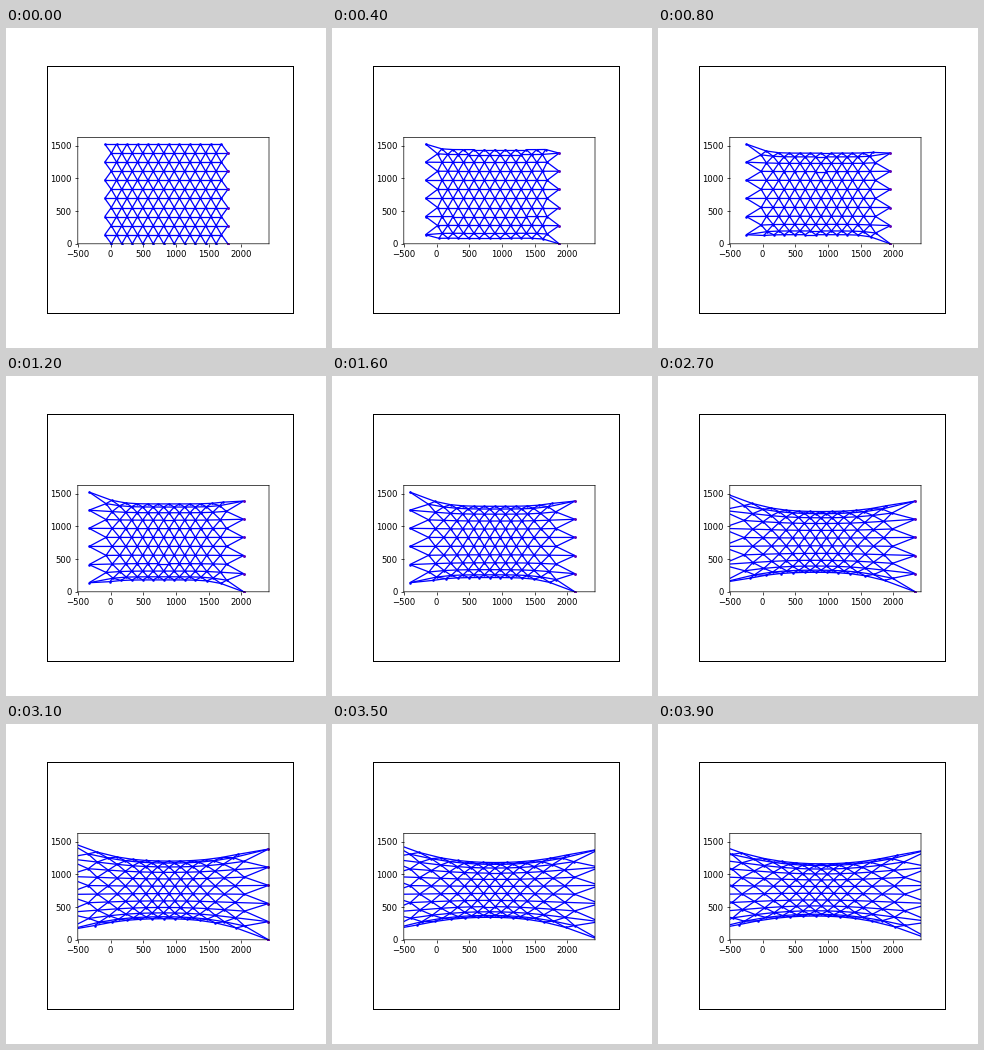
Write a matplotlib script that moves like this. It is 320 by 320 pixels and loops after 4000 ms.

```python
import numpy as np
import matplotlib.pyplot as plt
from matplotlib.animation import FuncAnimation
from matplotlib.collections import LineCollection

STAGE = 320
FRAMES = 40
N = 12                # nodes per row and number of rows
SPACING = 160
ROW = SPACING * np.sqrt(3) / 2
LEFT = 12             # x of the first node in even rows
PULL = 20             # outward shift of the clamped ends per frame
RATE = 0.1            # relaxation rate
ZOOM = 0.616          # the chart is a scaled-down figure


def px_axes(fig, left, top, right, bottom):
    return fig.add_axes([left / STAGE, 1 - bottom / STAGE,
                         (right - left) / STAGE, (bottom - top) / STAGE])


def lattice():
    """Node positions and the index pairs joined by springs."""
    row, col = np.divmod(np.arange(N * N), N)
    x = LEFT + col * SPACING - (row % 2) * SPACING / 2
    nodes = np.column_stack([x, row * ROW]).astype(float)
    edges = []
    for r in range(N):
        for c in range(N):
            i = r * N + c
            if c < N - 1:
                edges.append((i, i + 1))
            if r < N - 1:
                side = c + 1 if r % 2 == 0 else c - 1
                edges.append((i, i + N))
                if 0 <= side < N:
                    edges.append((i, (r + 1) * N + side))
    return nodes, np.array(edges)


def simulate(nodes, edges):
    """Zero-length springs relax while the clamped ends move outward."""
    a, b = edges.T
    left = np.arange(1, N, 2) * N
    right = np.arange(0, N, 2) * N + N - 1
    free = np.ones(len(nodes), bool)
    free[left] = free[right] = False
    pos = nodes.copy()
    states = []
    for _ in range(FRAMES):
        pos[left, 0] -= PULL
        pos[right, 0] += PULL
        states.append(pos.copy())
        force = np.zeros_like(pos)
        stretch = pos[b] - pos[a]
        np.add.at(force, a, stretch)
        np.add.at(force, b, -stretch)
        pos[free] += RATE * force[free]
    return states, right


nodes, edges = lattice()
states, right_ends = simulate(nodes, edges)

fig = plt.figure(figsize=(3.2, 3.2), dpi=100, facecolor="white")

frame_ax = px_axes(fig, 40.8, 38.4, 287.2, 284.8)
frame_ax.set_xticks([])
frame_ax.set_yticks([])
for spine in frame_ax.spines.values():
    spine.set_linewidth(0.72)

ax = px_axes(fig, 71.8, 109.5, 263, 215.8)
ax.set_xlim(-500, 2420)
ax.set_ylim(0, 1624)
ax.set_xticks(range(-500, 2001, 500))
ax.set_yticks(range(0, 1501, 500))
ax.tick_params(labelsize=10 * ZOOM, length=3.5 * ZOOM,
               pad=3.5 * ZOOM, width=0.8 * ZOOM)
for spine in ax.spines.values():
    spine.set_linewidth(0.8 * ZOOM)
    spine.set_snap(False)

dots, = ax.plot([], [], "o", color="blue", ms=3 * ZOOM, mew=0, zorder=2)
springs = LineCollection([], colors="blue", linewidths=1.5 * ZOOM, zorder=2.1)
ax.add_collection(springs, autolim=False)
ends, = ax.plot([], [], "o", color=(0.45, 0, 0.65), ms=3 * ZOOM, mew=0,
                zorder=2.2)
for marks in (dots, ends):
    marks.set_snap(False)


def draw(n):
    pos = states[n]
    dots.set_data(pos[:, 0], pos[:, 1])
    ends.set_data(pos[right_ends, 0], pos[right_ends, 1])
    springs.set_segments(pos[edges])
    return dots, springs, ends


anim = FuncAnimation(fig, draw, frames=FRAMES, interval=100,
                     repeat=True, repeat_delay=0, blit=False)
plt.show()
```
